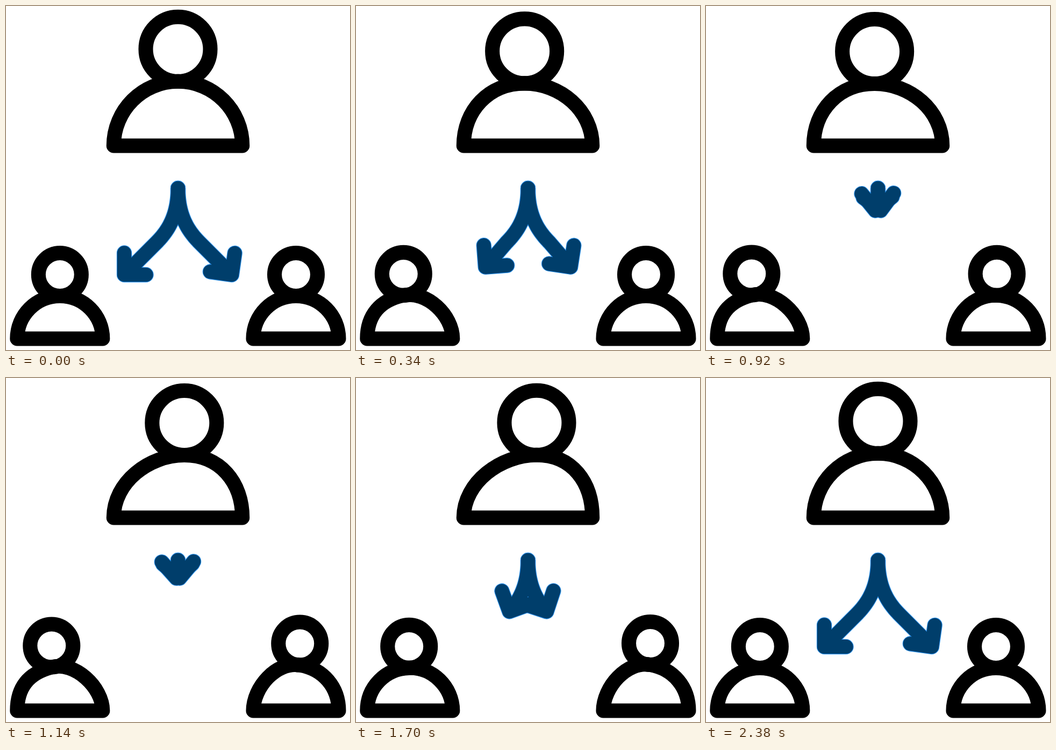
Write an HTML page with a canvas that moves like this. It is 640x640 px and loops after 2.4 s.

```html
<!DOCTYPE html>
<html lang="en">
<head>
<meta charset="utf-8">
<title>Delegation</title>
<style>
  html, body { margin: 0; width: 100%; height: 100%; overflow: hidden; background: #fff; }
  canvas { display: block; width: 100vmin; height: 100vmin; }
</style>
</head>
<body>
<canvas id="stage" width="640" height="640"></canvas>
<script>
const ctx = document.getElementById('stage').getContext('2d');
const LOOP = 2400;
const LINE = 27.1;
const KAPPA = 0.5523;
const RETRACT = 163;
const PRONG = 40.5;

const lerp = (a, b, p) => a + (b - a) * p;

// Eased progress from 0 to 1 between two times
function ease(t, start, end) {
  const u = Math.min(1, Math.max(0, (t - start) / (end - start)));
  return u * u * (3 - 2 * u);
}

// Rises to 1, holds, then falls back to 0
const pulse = (t, inStart, inEnd, outStart, outEnd) =>
  ease(t, inStart, inEnd) - ease(t, outStart, outEnd);

// The head and the crown of the shoulders move together by (dx, dy)
function person(cx, base, radius, headRadius, dx, dy, tilt) {
  const x = cx + dx;
  const y = base - radius + dy;
  const h = radius * KAPPA;
  const hx = h * Math.cos(tilt);
  const hy = h * Math.sin(tilt);
  ctx.strokeStyle = '#000';
  ctx.lineWidth = LINE;
  ctx.beginPath();
  ctx.moveTo(cx - radius, base);
  ctx.bezierCurveTo(cx - radius, base - h, x - hx, y - hy, x, y);
  ctx.bezierCurveTo(x + hx, y + hy, cx + radius, base - h, cx + radius, base);
  ctx.closePath();
  ctx.stroke();
  ctx.beginPath();
  ctx.arc(x, y - headRadius, headRadius, 0, Math.PI * 2);
  ctx.stroke();
}

// Arrow shaft: a curve that runs out into a straight line,
// which turns from the diagonal towards the vertical by the bend angle
function shaftPoints(bend, length) {
  const points = [];
  for (let i = 0; i <= 40; i++) {
    const t = i / 40, s = 1 - t;
    const mix = (a, b, c, d) =>
      a * s * s * s + 3 * b * s * s * t + 3 * c * s * t * t + d * t * t * t;
    points.push([mix(320, 320, 305, 280), mix(339, 385, 415, 440)]);
  }
  const angle = Math.PI / 4 - bend;
  points.push([280 - length * Math.sin(angle), 440 + length * Math.cos(angle)]);
  return points;
}

function trimEnd(points, amount) {
  const kept = points.slice();
  while (kept.length > 1) {
    const [x1, y1] = kept.pop();
    const [x0, y0] = kept[kept.length - 1];
    const length = Math.hypot(x1 - x0, y1 - y0);
    if (amount <= length) {
      const p = amount / length;
      kept.push([lerp(x1, x0, p), lerp(y1, y0, p)]);
      return kept;
    }
    amount -= length;
  }
  return kept;
}

function arrowPath(points, degrees, mirrored) {
  const [x, y] = points[points.length - 1];
  const angle = degrees * Math.PI / 180;
  const s = PRONG * Math.sin(angle);
  const c = PRONG * Math.cos(angle);
  const place = ([px, py]) => [mirrored ? 640 - px : px, py];
  const path = new Path2D();
  points.forEach((pt, i) => path[i ? 'lineTo' : 'moveTo'](...place(pt)));
  path.moveTo(...place([x - s, y - c]));
  path.lineTo(...place([x, y]));
  path.lineTo(...place([x + c, y - s]));
  return path;
}

function arrows(t) {
  const cut = RETRACT * pulse(t, 110, 1050, 1258, 2232);
  const turn = 0.16 * cut + 0.0006 * cut * cut;
  const shaft = trimEnd(shaftPoints(turn * Math.PI / 180, 84.8), cut);
  const paths = [
    arrowPath(shaft, turn, false),
    arrowPath(shaft, 8 + 0.0012 * cut * cut, true)
  ];
  for (const [color, width] of [['#2a90ea', 28.4], ['#003e6b', 26.2]]) {
    ctx.strokeStyle = color;
    ctx.lineWidth = width;
    paths.forEach(path => ctx.stroke(path));
  }
}

function draw(t) {
  ctx.fillStyle = '#fff';
  ctx.fillRect(0, 0, 640, 640);
  ctx.lineCap = ctx.lineJoin = 'round';

  const leanLeft = ease(t, 0, 460);
  const leanRight = ease(t, 870, 1240);
  const upright = 1 - ease(t, 1830, 2250);
  const topX = lerp(-7.6 * leanLeft, 16, leanRight) * upright;
  const topY = lerp(4.3 * leanLeft, 3, leanRight) * upright;
  person(320, 260, 119.7, 60, topX, topY, 0);

  const left = pulse(t, 50, 470, 1364, 1784);
  person(100.3, 619, 79.5, 40, -15.5 * left, -1.5 * left, -0.26 * left);

  const right = pulse(t, 800, 1220, 1825, 2245);
  person(539.5, 619, 79.5, 40, 8 * right, -6 * right, 0.18 * right);

  arrows(t);
}

function frame() {
  draw(performance.now() % LOOP);
  requestAnimationFrame(frame);
}
frame();
</script>
</body>
</html>
```
